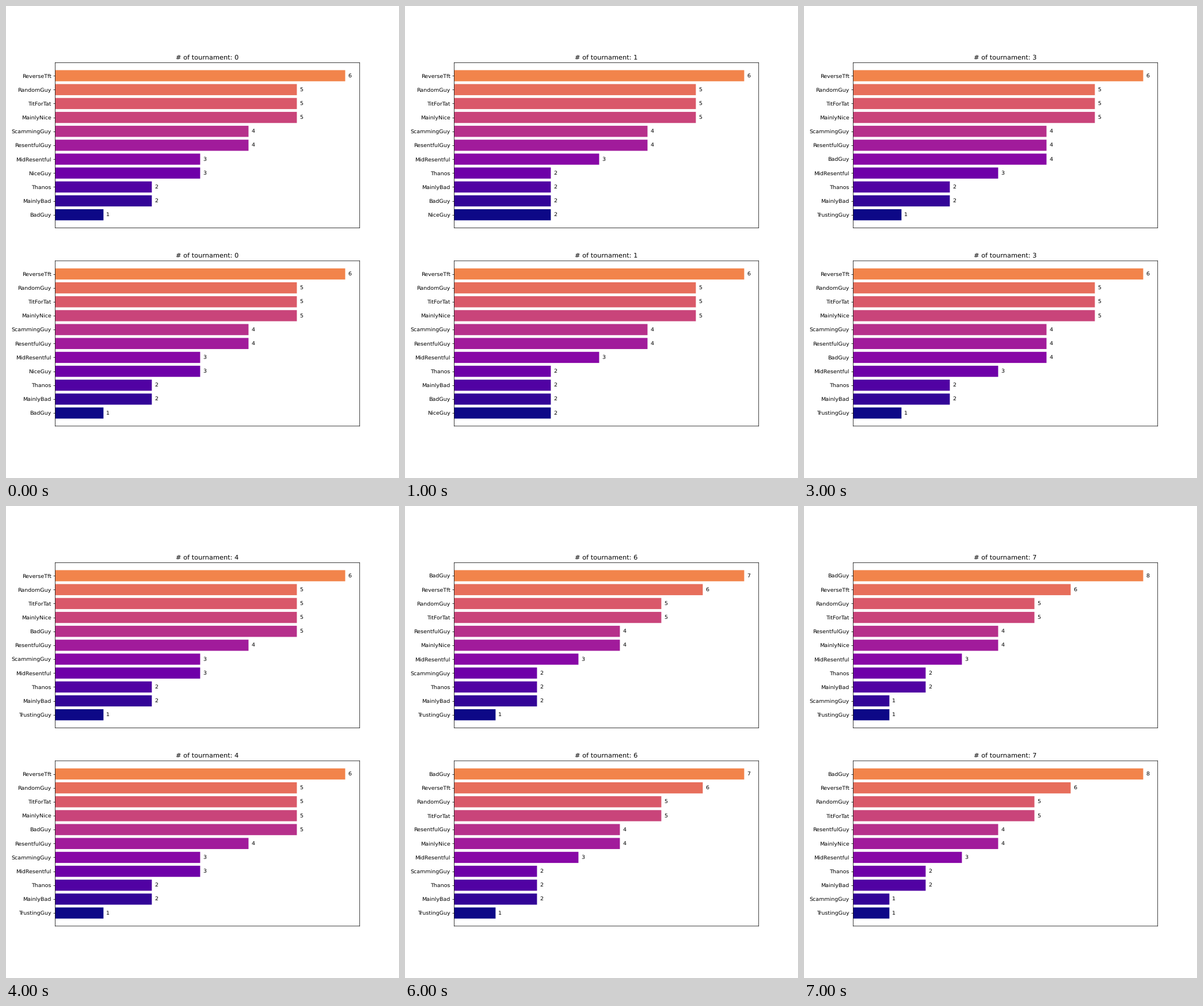
A matplotlib script that plays this animation: 683 by 820 pixels, repeating every 8 s.

```python
import matplotlib.pyplot as plt
import numpy as np
from matplotlib.animation import FuncAnimation

W, H = 683, 820
DPI = H / 12
ROUNDS = 8
SHOWN = 11

# Starting scores; the order settles ties, lowest bar first.
START = {
    "TrustingGuy": 1, "NiceGuy": 3, "BadGuy": 1, "MainlyNice": 5,
    "MainlyBad": 2, "TitForTat": 5, "RandomGuy": 5, "Thanos": 2,
    "ResentfulGuy": 4, "MidResentful": 3, "ScammingGuy": 4, "ReverseTft": 6,
}
WINNER = "BadGuy"
LOSERS = ["NiceGuy"] * 3 + ["ScammingGuy", "MainlyNice"] + ["ScammingGuy"] * 2

# Soft edges: neither shapes nor glyphs are fitted to the pixel grid.
plt.rcParams.update({
    "font.family": "DejaVu Sans",
    "path.snap": False,
    "text.hinting": "none",
})
# The tiny margin keeps the pixel size from being truncated.
fig, axes = plt.subplots(2, 1, figsize=((W + 1e-3) / DPI, (H + 1e-3) / DPI), dpi=DPI)
colors = plt.cm.plasma(np.linspace(0, 0.7, SHOWN))


def standings(n):
    scores = dict(START)
    for loser in LOSERS[:n]:
        scores[loser] -= 1
        scores[WINNER] += 1
    return sorted(scores.items(), key=lambda item: item[1])[-SHOWN:]


def draw_chart(ax, n):
    names, scores = zip(*standings(n))
    ax.clear()
    bars = ax.barh(range(SHOWN), scores, color=colors)
    ax.bar_label(bars, padding=5)
    ax.set_yticks(range(SHOWN), names)
    ax.set_xticks([])
    ax.set_title(f"# of tournament: {n}")


def update(n):
    for ax in axes:
        draw_chart(ax, n)


anim = FuncAnimation(fig, update, frames=ROUNDS, init_func=lambda: update(0),
                     interval=1000, repeat=True, repeat_delay=0)
plt.show()
```
